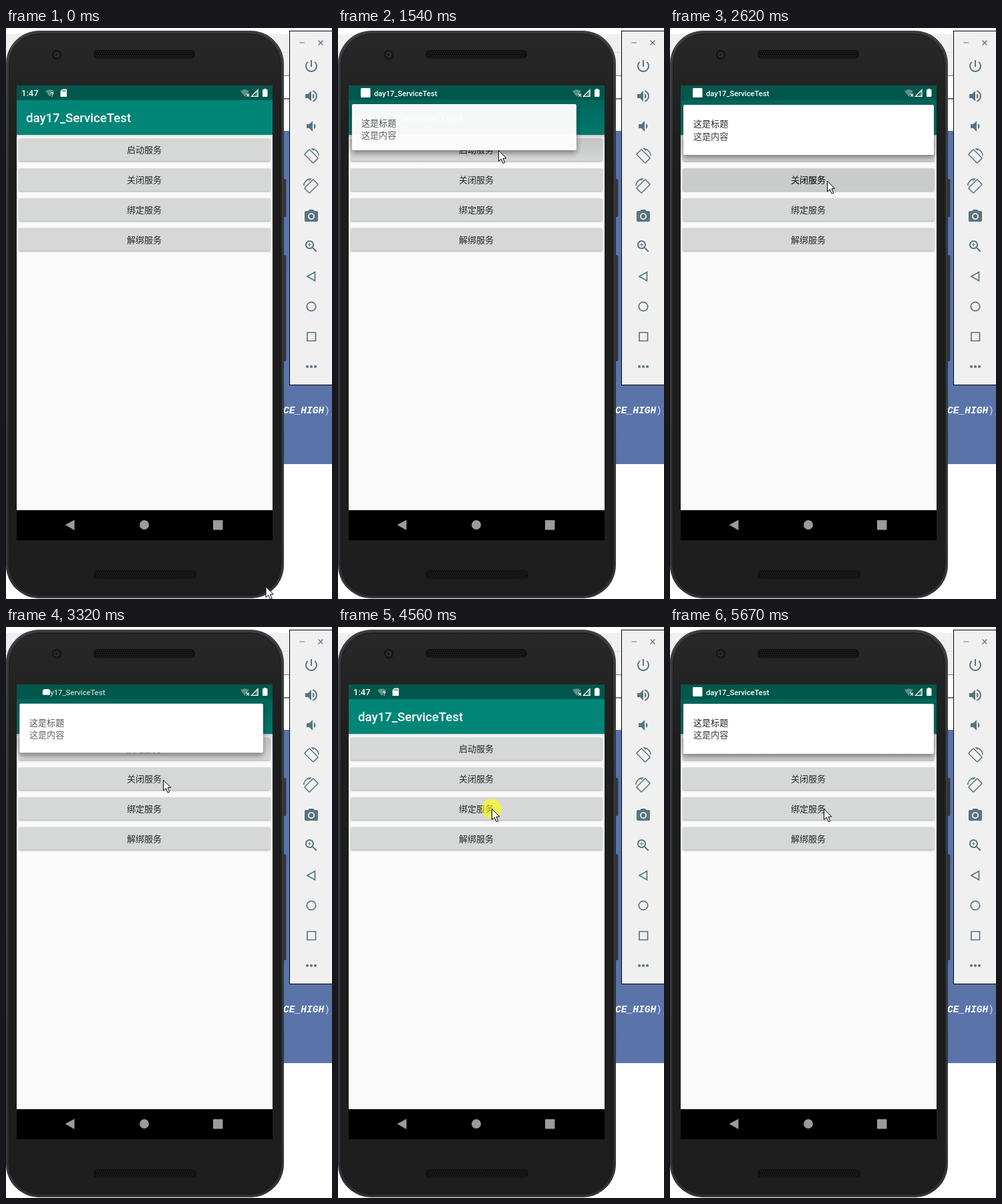
These frames come from a looping animation (488 by 855 pixels, 8 s). An HTML page with a canvas:

```html
<!DOCTYPE html>
<html lang="zh">
<head>
<meta charset="utf-8">
<style>
html, body { margin: 0; width: 100%; height: 100%; overflow: hidden; background: #fff; }
canvas { display: block; }
</style>
</head>
<body>
<canvas id="stage" width="488" height="855"></canvas>
<script>
const W = 488, H = 855, LOOP = 8000;
const CJK = '"Noto Sans CJK SC", "Noto Sans CJK", sans-serif';
const ROBOTO = 'Roboto, sans-serif';
const APP = 'day17_ServiceTest';
const view = document.getElementById('stage').getContext('2d');
let c = view;

const clamp = (v, a = 0, b = 1) => Math.min(b, Math.max(a, v));
const lerp = (a, b, p) => a + (b - a) * p;
const ease = p => p * p * (3 - 2 * p);

function rect(x, y, w, h, fill) {
  c.fillStyle = fill;
  c.fillRect(x, y, w, h);
}
function round(x, y, w, h, r, fill) {
  c.beginPath();
  c.roundRect(x, y, w, h, r);
  if (fill) { c.fillStyle = fill; c.fill(); }
}
function disc(x, y, r, fill) {
  c.beginPath();
  c.arc(x, y, r, 0, Math.PI * 2);
  c.fillStyle = fill;
  c.fill();
}
function poly(points, fill) {
  c.beginPath();
  points.forEach(([x, y]) => c.lineTo(x, y));
  c.closePath();
  if (fill) { c.fillStyle = fill; c.fill(); }
}
function text(s, x, y, font, fill, align = 'left') {
  c.font = font;
  c.fillStyle = fill;
  c.textAlign = align;
  c.fillText(s, x, y);
}
function gradient(x0, y0, x1, y1, ...stops) {
  const g = c.createLinearGradient(x0, y0, x1, y1);
  stops.forEach(([p, color]) => g.addColorStop(p, color));
  return g;
}
function shadow(color, blur, dy) {
  c.shadowColor = color;
  c.shadowBlur = blur;
  c.shadowOffsetY = dy;
}
function faded(alpha, draw) {
  if (alpha <= 0) return;
  c.save();
  c.globalAlpha *= clamp(alpha);
  draw();
  c.restore();
}

// Desktop behind the phone
function drawDesktop() {
  rect(0, 0, W, H, '#fff');
  rect(0, 9, W, 63, '#f0f0f0');
  rect(0, 36, W, 1, '#dcdcdc');
  rect(380, 71, 50, 1, '#6e6e6e');
  rect(380, 105, 50, 2, '#777');
  rect(380, 107, 50, 47, '#f9f9f9');
  rect(380, 154, 108, 499, '#5a73a9');
  text('CE_HIGH', 415, 577, 'italic bold 14.6px "Liberation Mono", monospace', '#fff');
  text(');,', 476, 577, '14.6px "Liberation Mono", monospace', '#d5dae6');
}

function drawGrille(x, y, w, h) {
  round(x, y, w, h, 6, '#111');
  for (let j = 2; j < h - 1; j += 3)
    for (let i = 4 + (j % 2) * 1.5; i < w - 4; i += 3) rect(x + i, y + j, 1, 1, '#343434');
}

function drawPhone() {
  round(414, 226, 5.5, 57, 2, '#34373b');
  round(414, 340, 5.5, 159, 2, '#34373b');
  round(0, 4, 416, 850, 50, gradient(0, 4, 0, 854, [0, '#36393a'], [0.3, '#2b2d2e'], [1, '#26282a']));
  round(1.5, 5.5, 413, 847, 49);
  c.strokeStyle = '#45494c';
  c.lineWidth = 1;
  c.stroke();
  round(5, 9, 406, 840, 46, gradient(0, 9, 0, 849, [0, '#282828'], [0.2, '#1e1e1e'], [1, '#1e1e1e']));
  c.strokeStyle = '#151617';
  c.stroke();
  disc(76, 40, 7.5, '#181818');
  disc(76, 40, 4, '#303336');
  disc(75.5, 40, 2, '#121417');
  drawGrille(131, 33, 152, 13);
  drawGrille(131, 812, 154, 13);
}

const ICONS = [
  [57, 'M13 3h-2v10h2V3zm4.83 2.17l-1.42 1.42C17.99 7.86 19 9.81 19 12c0 3.87-3.13 7-7 7s-7-3.13-7-7c0-2.19 1.01-4.14 2.58-5.42L6.17 5.17C4.23 6.82 3 9.26 3 12c0 4.97 4.03 9 9 9s9-4.03 9-9c0-2.74-1.23-5.18-3.17-6.83z'],
  [102, 'M3 9v6h4l5 5V4L7 9H3zm13.5 3c0-1.77-1.02-3.29-2.5-4.03v8.05c1.48-.73 2.5-2.25 2.5-4.02zM14 3.23v2.06c2.89.86 5 3.54 5 6.71s-2.11 5.85-5 6.71v2.06c4.01-.91 7-4.49 7-8.77s-2.99-7.86-7-8.77z'],
  [147, 'M18.5 12c0-1.77-1.02-3.29-2.5-4.03v8.05c1.48-.73 2.5-2.25 2.5-4.02zM5 9v6h4l5 5V4L9 9H5z'],
  [282, 'M9 2L7.17 4H4c-1.1 0-2 .9-2 2v12c0 1.1.9 2 2 2h16c1.1 0 2-.9 2-2V6c0-1.1-.9-2-2-2h-3.17L15 2H9zm3 15c-2.76 0-5-2.24-5-5s2.24-5 5-5 5 2.24 5 5-2.24 5-5 5zM15.2 12a3.2 3.2 0 1 1-6.4 0a3.2 3.2 0 1 1 6.4 0z'],
  [327, 'M15.5 14h-.79l-.28-.27C15.41 12.59 16 11.11 16 9.5 16 5.91 13.09 3 9.5 3S3 5.91 3 9.5 5.91 16 9.5 16c1.61 0 3.09-.59 4.23-1.57l.27.28v.79l5 4.99L20.49 19l-4.99-5zm-6 0C7.01 14 5 11.99 5 9.5S7.01 5 9.5 5 14 7.01 14 9.5 11.99 14 9.5 14zM12 10h-2v2H9v-2H7V9h2V7h1v2h2z']
];
const ROTATE = 'M16.48 2.52c3.27 1.55 5.61 4.72 5.97 8.48h1.5C23.44 4.84 18.29 0 12 0l-.66.03 3.81 3.81 1.33-1.32zm-6.25-.77c-.59-.59-1.54-.59-2.12 0L1.75 8.11c-.59.59-.59 1.54 0 2.12l12.02 12.02c.59.59 1.54.59 2.12 0l6.36-6.36c.59-.59.59-1.54 0-2.12L10.23 1.75zm4.6 19.44L2.81 9.17l6.36-6.36 12.02 12.02-6.36 6.36z';

function drawIcon(y, path, flip = 1) {
  c.save();
  c.translate(457, y);
  c.scale(flip, 1);
  c.translate(-12, -12);
  c.fill(new Path2D(path), 'evenodd');
  c.restore();
}

function drawToolbar() {
  const ink = '#57747f';
  rect(424, 4, 64, 531, '#000');
  rect(425, 5, 63, 529, '#f0f0f0');
  c.strokeStyle = c.fillStyle = ink;
  ICONS.forEach(([y, path]) => drawIcon(y, path));
  drawIcon(192, ROTATE);
  drawIcon(237, ROTATE, -1);
  c.lineWidth = 1.2;
  c.stroke(new Path2D('M439.5 22h7.5M467.5 18.5l7 7m0-7l-7 7'));
  c.lineWidth = 1.7;
  c.stroke(new Path2D('M451 372l11.5-6.5v13zM451 456h12.5v12.5H451z'));
  c.beginPath();
  c.arc(457, 417, 6.7, 0, 7);
  c.stroke();
  [451, 457, 463].forEach(x => disc(x, 507, 2.1, ink));
}

const BUTTONS = ['启动服务', '关闭服务', '绑定服务', '解绑服务'];
const buttonY = i => 165.5 + 44.75 * i;

function drawScreen() {
  rect(16, 86, 383, 681, '#fafafa');
  rect(16, 108, 383, 52, '#008577');
  rect(16, 160, 383, 1, 'rgba(0,0,0,.14)');
  rect(16, 161, 383, 2, 'rgba(0,0,0,.05)');
  text(APP, 30, 141, '500 18.64px ' + ROBOTO, '#fff');
  BUTTONS.forEach((label, i) => {
    c.save();
    shadow('rgba(0,0,0,.35)', 2.5, 1);
    round(19, buttonY(i), 376.5, 33.8, 2, '#d6d7d7');
    c.restore();
    drawLabel(i);
  });
  rect(16, 722, 383, 45, '#000');
  poly([[88.5, 744], [102.5, 736.5], [102.5, 752]], '#9b9b9b');
  disc(207, 744, 7, '#9b9b9b');
  round(310, 737, 14.5, 14.5, 1, '#9b9b9b');
}

function drawLabel(i) {
  text(BUTTONS[i], 207, buttonY(i) + 21.8, '13.05px ' + CJK, '#25292a', 'center');
}

function drawWifi(x) {
  c.beginPath();
  c.moveTo(x, 94.5);
  c.quadraticCurveTo(x + 6.5, 90, x + 13, 94.5);
  c.lineTo(x + 6.5, 103);
  c.closePath();
  c.fillStyle = '#5f918a';
  c.fill();
}

function drawClock() {
  text('1:47', 23, 102, '500 13.05px ' + ROBOTO, '#fff');
  drawWifi(59);
  text('?', 67, 103, 'bold 9px ' + ROBOTO, '#fff');
  poly([[84.5, 91.5], [91, 91.5], [91, 103], [81.5, 103], [81.5, 94.5]], '#fff');
  [84.5, 86.5, 88.5].forEach(x => rect(x, 93, 1, 2.5, '#00574b'));
}

function drawSignals() {
  drawWifi(351);
  c.strokeStyle = '#fff';
  c.lineWidth = 1.3;
  c.stroke(new Path2D('M360 98.5l4 4m0-4l-4 4'));
  c.stroke(new Path2D('M367.5 102.3h9.5v-9.7z'));
  poly([[373.5, 96], [377, 92.5], [377, 102.3], [373.5, 102.3]], 'rgba(255,255,255,.3)');
  rect(386, 91, 3.5, 2, '#fff');
  round(384, 92, 7.5, 11, 1, '#fff');
}

// Picture changes happen in discrete steps: [first, last, count]
const WINDOWS = [
  [70, 830, 11], [920, 1230, 5], [1460, 2230, 11], [2300, 2710, 6],
  [3320, 3640, 5], [4100, 4880, 11], [5200, 5670, 7]
];
function snap(t) {
  let at = 0;
  for (const [first, last, count] of WINDOWS) {
    if (t < first) break;
    const step = (last - first) / (count - 1);
    at = first + step * Math.min(count - 1, Math.floor((t - first) / step + 0.12));
  }
  return at;
}

// [start, end, x, y]
const MOVES = [[0, 830, 240, 183], [1680, 2230, 235, 228.5], [4030, 4490, 230, 272]];
function cursorAt(t) {
  let x = 388.5, y = 836;
  for (const [start, end, toX, toY] of MOVES) {
    const p = ease(clamp((t - start) / (end - start)));
    x = lerp(x, toX, p);
    y = lerp(y, toY, p);
  }
  return [x, y];
}

// [start, length, button]
const CLICKS = [[920, 310, 0], [2300, 410, 1], [4560, 320, 2]];
function drawRipple(t, x) {
  for (const [start, length, i] of CLICKS) {
    const age = t - start;
    if (age < 60 || age >= length - 2) continue;
    const p = clamp(age / 290);
    c.save();
    round(19, buttonY(i), 376.5, 33.8, 2);
    c.clip();
    const alpha = 0.1 * clamp((length - age) / 150);
    disc(lerp(x, 207, p), buttonY(i) + 17, 70 + age * 0.81, `rgba(0,0,0,${alpha})`);
    c.restore();
    drawLabel(i);
  }
}

// k: 0 = fully open, 1 = tucked in
function headsUp(t) {
  const opening = start => {
    const k = Math.pow(0.3, (t - start) / 77);
    return { k, alpha: 1 - 0.4 * k * k, ink: 1 - 0.6 * k, label: k > 0.9 ? 0.4 : 1 };
  };
  if (t >= 5200) return opening(5200);
  if (t >= 3320) {
    const age = t - 3320;
    if (age > 310) return null;
    const k = 0.08 + 0.92 * Math.pow(age / 260, 1.5);
    const alpha = clamp((320 - age) / 150);
    return { k, alpha, ink: 0.78 - age / 330, label: 0.75 - age / 200, closing: true, age };
  }
  return t >= 1460 ? opening(1460) : null;
}

function drawHeadsUp({ k, alpha, ink }) {
  faded(alpha, () => {
    rect(16, 108, 383, 92, gradient(0, 108, 0, 200, [0, 'rgba(0,0,0,.24)'], [1, 'rgba(0,0,0,0)']));
    const x = 20 + 3 * k, y = 115 - 3 * k;
    c.save();
    shadow('rgba(0,0,0,.42)', 9, 4);
    round(x, y, 395 - 127 * k - x, 190 - 23 * k - y, 2, '#fff');
    c.restore();
    faded(ink, () => {
      text('这是标题', 35, 148 - 5 * k, '13.05px ' + CJK, '#2a2a2a');
      text('这是内容', 35, 166.5 - 5 * k, '13.05px ' + CJK, '#3c3c3c');
    });
  });
}

function drawStatus(state) {
  rect(16, 86, 383, 22, '#00574b');
  drawSignals();
  if (!state) return drawClock();
  faded(state.label, () => text(APP, 54, 101.5, '500 11.2px ' + ROBOTO, '#fff'));
  if (!state.closing) {
    faded(state.label, () => round(34, 90, 14.5, 14, 1.5, '#fff'));
  } else if (state.age < 60) {
    round(55, 93, 11, 8.5, 3, '#fff');
  } else {
    faded((state.age - 130) / 160, drawClock);
  }
}

function drawCursor(x, y) {
  c.save();
  c.translate(x + 0.5, y + 0.5);
  poly([[0, 0], [0, 16], [3.8, 12.6], [6.6, 19], [9.2, 18], [6.5, 11.8], [11.3, 11.5]], '#fff');
  c.strokeStyle = '#000';
  c.lineWidth = 1;
  c.stroke();
  c.restore();
}

const backdrop = document.createElement('canvas');
backdrop.width = W;
backdrop.height = H;
c = backdrop.getContext('2d');
[drawDesktop, drawPhone, drawScreen, drawToolbar].forEach(draw => draw());
c = view;

function render(now) {
  const t = snap(now % LOOP);
  const [x, y] = cursorAt(t);
  const state = headsUp(t);
  c.drawImage(backdrop, 0, 0);
  drawRipple(t, x);
  drawStatus(state);
  if (state) drawHeadsUp(state);
  if (CLICKS.some(([start]) => t >= start && t < start + 60)) disc(x, y, 15, 'rgba(255,255,0,.6)');
  drawCursor(x, y);
  requestAnimationFrame(render);
}
const begin = performance.now();
const loop = () => render(Math.max(0, performance.now() - begin));
requestAnimationFrame(function tick() {
  c.clearRect(0, 0, W, H);
  frame(Math.max(0, performance.now() - begin));
  requestAnimationFrame(tick);
});
function frame(ms) {
  const t = snap(ms % LOOP);
  const [x, y] = cursorAt(t);
  const state = headsUp(t);
  c.drawImage(backdrop, 0, 0);
  drawRipple(t, x);
  drawStatus(state);
  if (state) drawHeadsUp(state);
  if (CLICKS.some(([start]) => t >= start && t < start + 60)) disc(x, y, 15, 'rgba(255,255,0,.6)');
  drawCursor(x, y);
}
</script>
</body>
</html>
```
